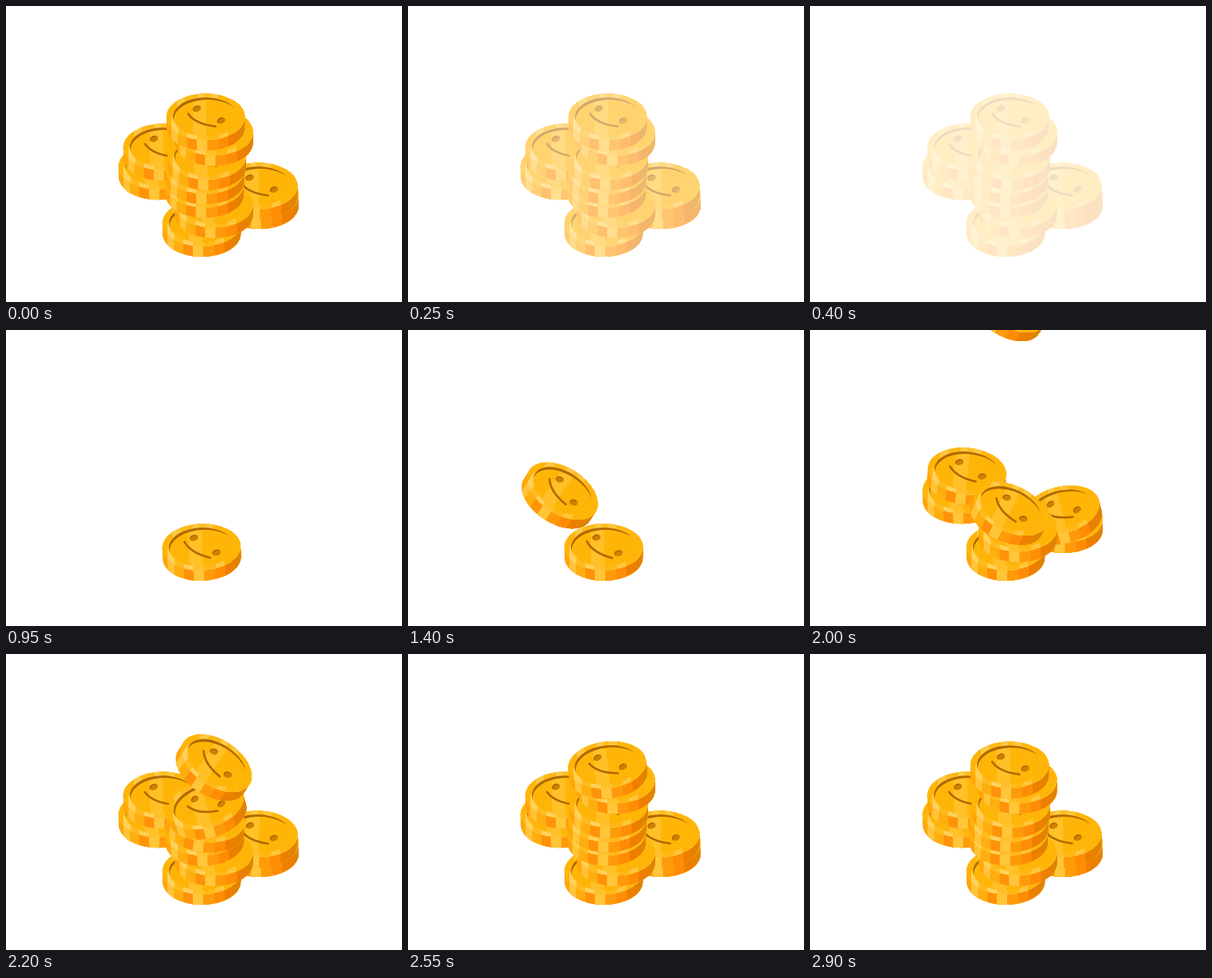
These frames come from a looping animation (498 by 373 pixels, 3500 ms). An HTML page:

```html
<!DOCTYPE html>
<html>
<head>
<meta charset="utf-8">
<title>Coin stack</title>
<style>
  html, body { margin: 0; width: 100%; height: 100%; overflow: hidden; background: #fff; }
  svg { display: block; }
</style>
</head>
<body>
<svg width="498" height="373" viewBox="0 0 498 373">
  <defs>
    <clipPath id="body"><path d="M-49.2 0A49.2 29.2 0 0 1 49.2 0V13.3A49.2 29.2 0 0 1 -49.2 13.3Z"/></clipPath>
    <clipPath id="top"><ellipse rx="49.2" ry="29.2"/></clipPath>
    <clipPath id="dish"><ellipse rx="41" ry="24.5"/></clipPath>
    <g id="coin">
      <g id="side" clip-path="url(#body)"></g>
      <g id="rim" clip-path="url(#top)"></g>
      <g clip-path="url(#dish)">
        <rect x="-50" y="-30" width="100" height="60" fill="#ffb508"/>
        <rect x="-16" y="-30" width="17" height="60" fill="#ffc028"/>
      </g>
      <path d="M-40 5.4A41 24.5 0 0 1 36 -11.7A42.4 25.35 0 0 0 -40 5.4Z" fill="#b06800"/>
    </g>
    <g id="smile">
      <path d="M-22 -4Q-13 9 12.5 12" fill="none" stroke="#b06800" stroke-width="2.6" stroke-linecap="round"/>
      <g id="eye" transform="translate(-11 -10.5) rotate(-22)">
        <ellipse rx="5.2" ry="3.7" fill="#b06800"/>
        <ellipse cx=".5" cy=".9" rx="4.6" ry="2.8" fill="#d08000"/>
      </g>
      <use href="#eye" x="30.5" y="15"/>
    </g>
  </defs>
  <g id="pile"></g>
</svg>
<script>
const $ = id => document.getElementById(id);
const NS = 'http://www.w3.org/2000/svg';

function add(parent, tag, attrs) {
  const node = parent.appendChild(document.createElementNS(NS, tag));
  for (const key in attrs) node.setAttribute(key, attrs[key]);
  return node;
}

// Vertical bands: each starts at its x and runs to the right edge.
function bands(id, list, y) {
  for (const [x, fill] of list)
    add($(id), 'rect', { x, y, width: 51 - x, height: 76, fill });
}
bands('side', [[-51, '#ffa50a'], [-43, '#ffc43a'], [-35, '#ffae10'],
  [-23, '#ff9208'], [-11, '#ffc63a'], [2, '#ff9a0a'], [16, '#ff8c05'], [29, '#ed7f00'], [41, '#e08400']], -31);
bands('rim', [[-51, '#ffb508'], [-36, '#ffc83f'], [-26, '#ffb91a'], [-10, '#ffcb48'], [-2, '#ffbd20'],
  [6, '#ffc63e'], [16, '#ffb508']], -31);
bands('rim', [[-51, '#ffb508'], [-43, '#ffd15c'], [-34, '#ffbb1c'], [-23, '#ffd15c'],
  [-11, '#ffc02a'], [3, '#ffb814'], [17, '#ffc63e'], [28, '#ffb508']], 0);

// x, y of the top face, landing time, turn of the smile; listed back to front
const coins = [
  [190.8, 201.8, 1400], [196.8, 177.8, 1850],
  [318.7, 238.5, 1578], [317.2, 226.7, 1925],
  [246, 273.5, 850, 9], [261.3, 250, 1756.5], [249.7, 224.5, 1990],
  [250.2, 207.5, 2060], [252.5, 189.5, 2133], [261.3, 159, 2206.5], [251, 139.7, 2458]
].map(([x, y, land, turn = 0]) => {
  const node = add($('pile'), 'g', {});
  add(node, 'use', { href: '#coin' });
  add(node, 'use', { href: '#smile', transform: `rotate(${turn})` });
  return { x, y, land, node };
});

const LOOP = 3500, FADE = 500, SPEED = 4.1, TILT = 33;

function draw(now) {
  const t = now % LOOP;
  const fading = t < FADE;
  $('pile').setAttribute('opacity', fading ? 1 - (t / FADE) ** 1.25 : 1);
  for (const { x, y, land, node } of coins) {
    const dt = fading ? LOOP : t - land;
    const drop = Math.min(dt, 0) * SPEED;
    const tilt = dt < 0 ? TILT : dt > 440 ? 0 :
      TILT * Math.exp(-dt / 95) * Math.cos(dt / 70 * Math.PI);
    node.setAttribute('transform', `translate(${x} ${y + drop}) rotate(${tilt} 0 6.5)`);
  }
}

const start = performance.now();
function tick() {
  draw(performance.now() - start);
  requestAnimationFrame(tick);
}
draw(0);
requestAnimationFrame(tick);
</script>
</body>
</html>
```
